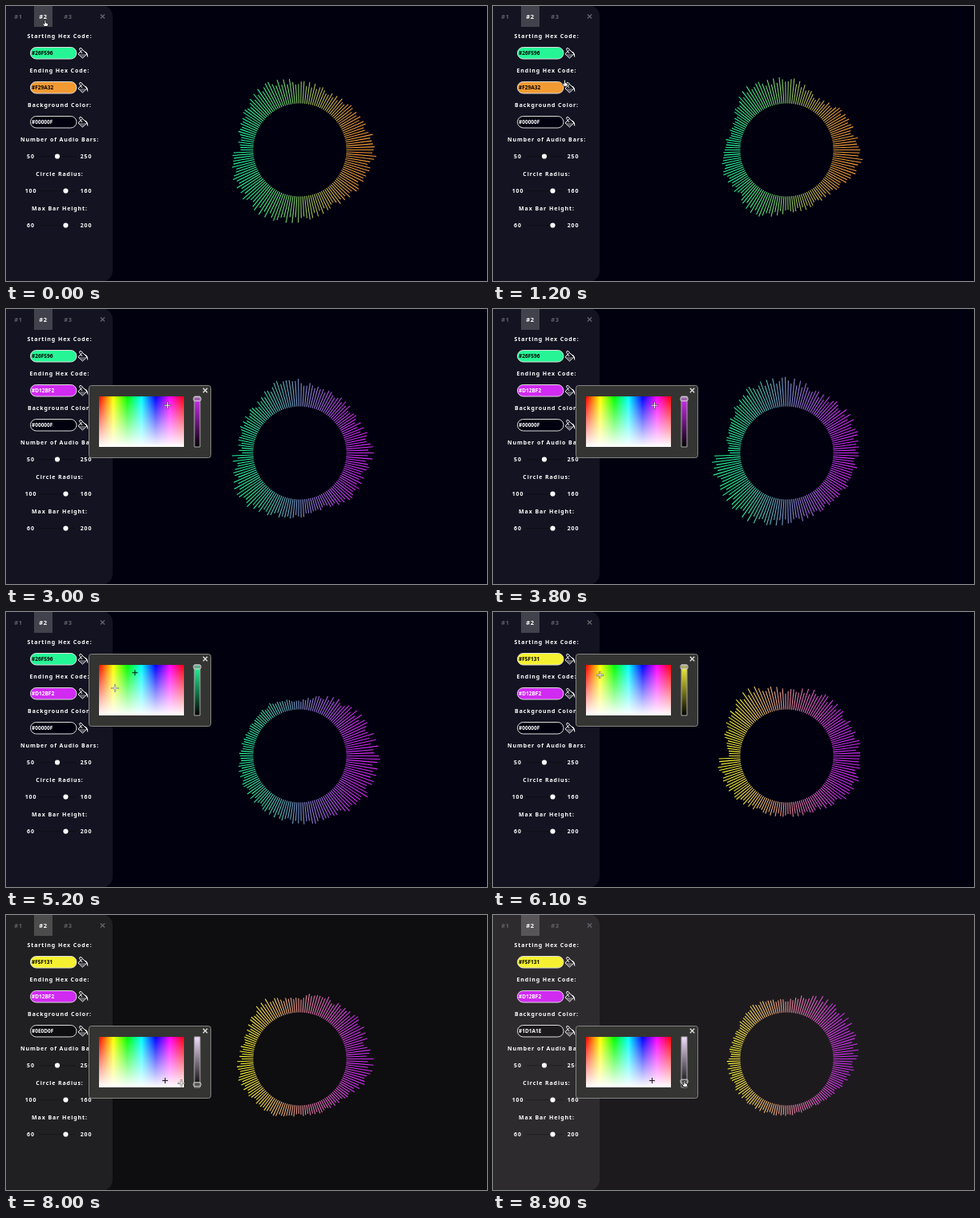
These frames come from a looping animation (600 px wide and 343 px high, 9 s). An HTML page with a canvas:

```html
<!DOCTYPE html>
<html lang="en">
<head>
<meta charset="utf-8">
<title>Audio ring settings</title>
<style>
html, body { margin: 0; width: 100%; height: 100%; overflow: hidden; background: #00000f; }
canvas { display: block; }
</style>
</head>
<body>
<canvas id="stage" width="600" height="343"></canvas>
<script>
const g = document.getElementById('stage').getContext('2d');
const LOOP = 9000, STEP = 100, BARS = 150, CX = 366.5, CY = 179.5, RADIUS = 58;
const FONT = '"Noto Sans", "Open Sans", sans-serif';
const clamp = (x, a = 0, b = 1) => Math.min(b, Math.max(a, x));
const lerp = (a, b, u) => a + (b - a) * u;

// Loudness around the ring: time, then 13 levels clockwise from the left
const levels = [
  [0, [16, 23, 33, 26, 21, 26, 35, 28, 22, 29, 34, 31, 24]],
  [2100, [18, 17, 31, 27, 18, 25, 29, 22, 13, 13, 20, 23, 19]],
  [3800, [14, 22, 34, 33, 25, 32, 30, 26, 24, 28, 36, 34, 33]],
  [5200, [16, 13, 16, 10, 24, 32, 38, 37, 27, 25, 22, 20, 17]],
  [6100, [13, 27, 36, 22, 30, 29, 33, 33, 18, 16, 18, 25, 27]],
  [7100, [13, 22, 34, 16, 24, 27, 36, 21, 16, 17, 18, 25, 24]],
  [8900, [13, 13, 21, 14, 29, 31, 28, 16, 9, 12, 14, 15, 15]]
];
levels.push([LOOP, levels[0][1]]);

// Place on the colour field for a hue, an amount of white and a picker row
const spot = (hue, white, row) => [116 + hue * 106 / 360, 66 + 43 * row + 63 * white];

// Pointer stops: arrival time, x, y; each move takes at most TRAVEL
const TRAVEL = 400;
const stops = [
  [0, 49, 21], [900, 50, 62], [1300, 97, 102], [2100, 150, 126],
  [3000, ...spot(290.05, .1777, 1)], [4300, 248, 102], [4700, 97, 59],
  [5200, 136, 95], [5800, ...spot(58.78, .2, 0)], [6500, 248, 59], [6800, 97, 145],
  [7100, 141, 177], [7800, ...spot(280, .8667, 2)], [8200, 239, 213], [8700, 239, 210]
];

// from/to: the pointer drags the marker; open/shut: the popup shows
const pickers = [
  { label: 'Starting Hex Code:', hue: 152.46, white: .1551, value: 245 / 255, from: 5300, to: 6000, open: 4800, shut: 6500 },
  { label: 'Ending Hex Code:', hue: 32.5, white: .2066, value: 242 / 255, from: 2200, to: 3600, open: 1500, shut: 4300 },
  { label: 'Background Color:', hue: 240, white: 0, value: 15 / 255, from: 7400, to: 7800, open: 6800, shut: LOOP }
];
const sliders = [
  ['Number of Audio Bars:', 50, 250, 64],
  ['Circle Radius:', 100, 160, 74.5],
  ['Max Bar Height:', 60, 200, 74.5]
];

// The two keys around t
function around(keys, t) {
  let i = 0;
  while (i < keys.length - 2 && t >= keys[i + 1][0]) i++;
  return [keys[i], keys[i + 1]];
}

function pointer(t) {
  const [a, b] = around(stops, t), leave = Math.max(a[0], b[0] - TRAVEL);
  const u = clamp((t - leave) / (b[0] - leave)), e = u * u * (3 - 2 * u);
  return [lerp(a[1], b[1], e), lerp(a[2], b[2], e)];
}

function pick(p, row, t) {
  let { hue, white, value } = p;
  if (t >= p.from) {
    const [x, y] = pointer(Math.min(t, p.to));
    hue = clamp((x - 116) / 106) * 360;
    white = clamp((y - 66 - 43 * row) / 63);
  }
  if (row == 2) value = lerp(15, 30, clamp((t - 8200) / 500)) / 255;
  const tint = [0, 4, 2].map(n => lerp(clamp(Math.abs((hue / 60 + n) % 6 - 3) - 1), 1, white) * 255);
  const hex = c => '#' + c.map(v => Math.round(v).toString(16).padStart(2, '0')).join('').toUpperCase();
  const rgb = tint.map(v => v * value);
  return { row, hue, white, value, top: hex(tint), hex: hex(rgb),
    ink: rgb[0] * .3 + rgb[1] * .59 + rgb[2] * .11 > 128 ? '#000' : '#fff' };
}

function text(s, x, y, size, color, spacing = .9, align = 'center') {
  g.font = `bold ${size}px ${FONT}`;
  g.letterSpacing = spacing + 'px';
  g.textAlign = align;
  g.fillStyle = color;
  g.fillText(s, x, y);
}

function box(x, y, w, h, r, fill, line) {
  g.beginPath();
  g.roundRect(x, y, w, h, r);
  if (fill) { g.fillStyle = fill; g.fill(); }
  if (line) { g.strokeStyle = line; g.lineWidth = 1; g.stroke(); }
}

function shape(d, x, y, fill, line, width = 1) {
  const p = new Path2D(d);
  g.save();
  g.translate(x, y);
  g.lineWidth = width;
  g.lineJoin = 'round';
  if (fill) { g.fillStyle = fill; g.fill(p); }
  if (line) { g.strokeStyle = line; g.stroke(p); }
  g.restore();
}

const cross = (x, y, r, color, width) => shape(`M${-r} ${-r}L${r} ${r}M${r} ${-r}L${-r} ${r}`, x, y, null, color, width);
const plus = (x, y, r, color, width) => shape(`M${-r} 0H${r}M0 ${-r}V${r}`, x, y, null, color, width);

function gradient(x0, y0, x1, y1, colors) {
  const f = g.createLinearGradient(x0, y0, x1, y1);
  colors.forEach((c, i) => f.addColorStop(i / (colors.length - 1), c));
  return f;
}

function ring(t, from, to) {
  const [a, b] = around(levels, t), u = (t - a[0]) / (b[0] - a[0]);
  const n = t / STEP, sway = Math.sin(Math.PI * u);
  g.strokeStyle = gradient(300, 0, 433, 0, [from, to]);
  g.lineWidth = 1.1;
  g.beginPath();
  for (let i = 0; i < BARS; i++) {
    const q = i / BARS * 12, k = Math.floor(q);
    const level = keys => lerp(keys[1][k], keys[1][k + 1], q - k);
    const beat = sway * .2 * Math.sin(q * 2.8 + n * 2.3) * Math.cos(q - n * 1.1);
    const jag = .12 * Math.sin(i * 2.2 + n * 1.9 + 2 * Math.sin(i * .6 + n));
    const h = lerp(level(a), level(b), u) * (1 + beat + jag);
    const angle = Math.PI * (1 + 2 * i / BARS), c = Math.cos(angle), s = Math.sin(angle);
    g.moveTo(CX + c * RADIUS, CY + s * RADIUS);
    g.lineTo(CX + c * (RADIUS + h), CY + s * (RADIUS + h));
  }
  g.stroke();
}

function bucket(x, y) {
  shape('M-.5-4.5L5 .8L-.5 6L-6 .8Z', x, y, null, '#fff');
  shape('M-5 1H4L-.5 5Z', x, y, 'rgba(255,255,255,.3)');
  shape('M-1 0L-3.5-3.5Q-5.5-6.5-3-6.5Q-1.5-6.5-.5-4.5', x, y, null, '#fff');
  shape('M2-2.8Q7-1 6.2 5.2Q5 4 4.6 1', x, y, '#fff');
}

function panel(picks) {
  box(-1, -1, 134, 345, [0, 14, 14, 0], 'rgba(255,255,255,.075)');
  g.fillStyle = 'rgba(255,255,255,.2)';
  g.fillRect(35, 0, 23, 26);
  ['#1', '#2', '#3'].forEach((s, i) => text(s, 15.5 + 31 * i, 15.5, 7.5, i == 1 ? '#fff' : '#62626a', .6));
  cross(120.5, 13, 2.6, '#62626a', 1.4);
  picks.forEach((p, i) => {
    const y = 40 + 43 * i;
    text(pickers[i].label, 67, y, 7, '#fff');
    box(30.5, y + 11.5, 57.5, 14.5, 7.25, p.hex, '#ddd');
    text(p.hex, 32, y + 21, 6.5, p.ink, 0, 'left');
    bucket(96, y + 19);
  });
  sliders.forEach(([label, min, max, knob], i) => {
    const y = 169 + 43 * i;
    text(label, 67, y, 7, '#fff');
    text(min, 31, y + 21, 7, '#fff');
    text(max, 100, y + 21, 7, '#fff');
    box(41, y + 18, 46, 1.2, .6, 'rgba(0,0,0,.25)');
    box(knob - 3.1, y + 15.4, 6.2, 6.2, 3.1, '#fff');
  });
}

function popup(p) {
  const y = 52 + 43 * p.row, field = y + 14;
  box(103.5, y + .5, 152, 90, 3, '#343532', '#858583');
  cross(248.5, y + 6.5, 2.7, '#ddd', 1.4);
  g.fillStyle = gradient(116, 0, 222, 0, ['#f00', '#ff0', '#0f0', '#0ff', '#00f', '#f0f', '#f00']);
  g.fillRect(116, field, 106, 63);
  g.fillStyle = gradient(0, field, 0, field + 63, ['rgba(255,255,255,0)', '#fff']);
  g.fillRect(116, field, 106, 63);
  box(235, field, 7, 63, 0, gradient(0, field, 0, field + 63, [p.top, '#000']), '#aaa');
  const [x, my] = spot(p.hue, p.white, p.row);
  plus(x, my, 3.5, '#111', 1);
  box(234, field + 63 * (1 - p.value) - 2.5, 9, 5, 1.5, 'rgba(130,130,130,.6)', '#ddd');
}

function cursor(x, y, open) {
  const top = open ? 52 + 43 * open.row : 0;
  const onField = open && x >= 116 && x <= 222 && y >= top + 14 && y <= top + 77;
  const onButton = y < 26 || (x > 89 && x < 103) || x > 230;
  if (onField) {
    plus(x, y, 4.5, 'rgba(40,40,40,.7)', 2.2);
    plus(x, y, 4, '#fff', 1);
  } else if (onButton) {
    shape('M-1-3Q0-4 .8-3V0L3.5 .8Q4 3 2.6 4.5H-1.2L-3.4 1.2Q-2.6 0-1 1.5Z', x, y, '#fff', '#111', .8);
  } else {
    shape('M0 0V8L2 6.2L3.4 9L4.6 8.4L3.3 5.7H6Z', x, y, '#fff', '#111', .7);
  }
}

function draw(now) {
  const t = Math.floor(now % LOOP / STEP) * STEP;
  const picks = pickers.map((p, i) => pick(p, i, t));
  const open = picks.find((p, i) => t >= pickers[i].open && t < pickers[i].shut);
  g.fillStyle = picks[2].hex;
  g.fillRect(0, 0, 600, 343);
  ring(t, picks[0].hex, picks[1].hex);
  panel(picks);
  if (open) popup(open);
  cursor(...pointer(t), open);
}

const start = performance.now();
(function tick() {
  draw(performance.now() - start);
  requestAnimationFrame(tick);
})();
</script>
</body>
</html>
```
